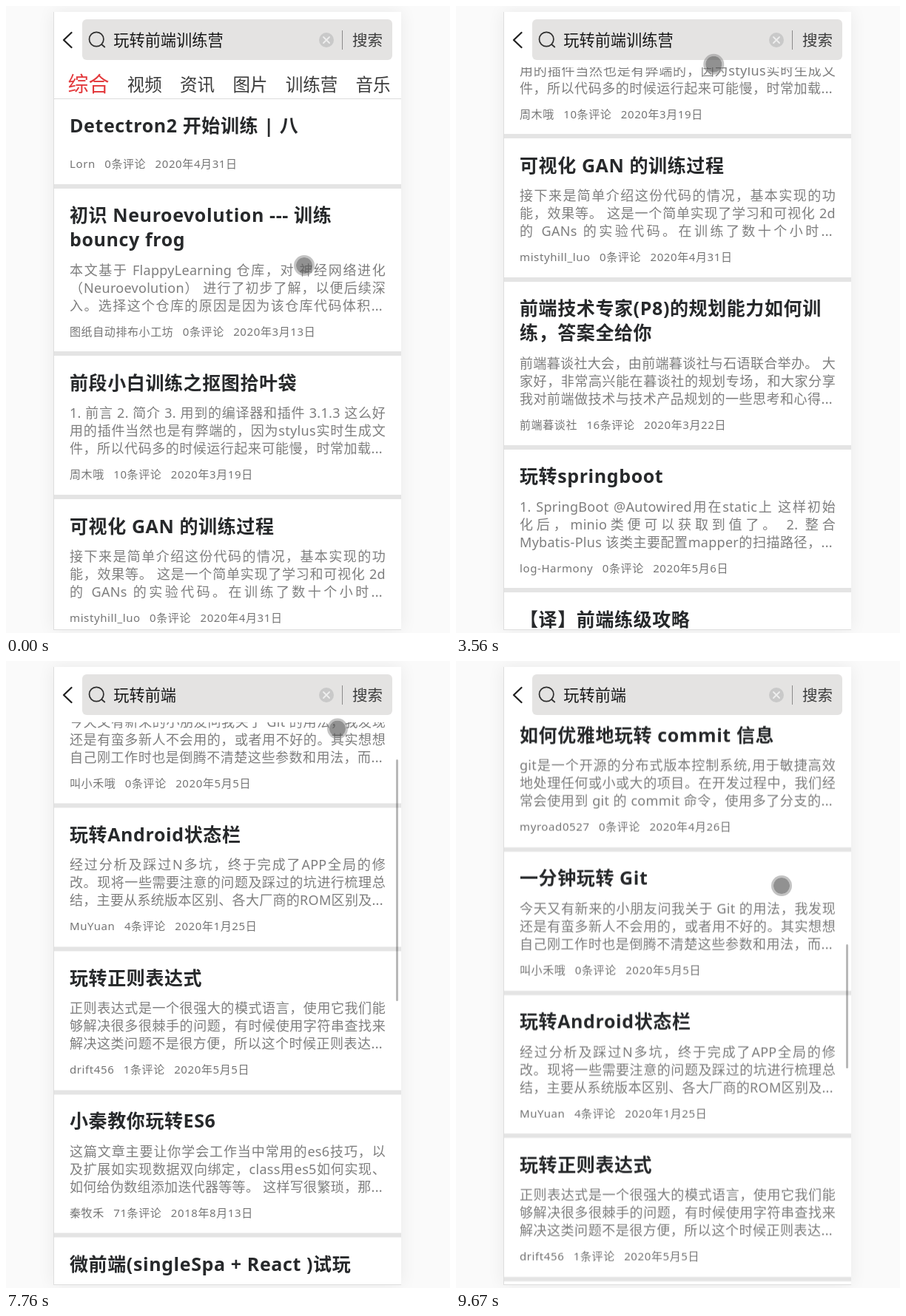
Recreate the animation shown at these times as an HTML page. Size 600 by 848 pixels, loop 9740 ms.

```html
<!DOCTYPE html>
<html lang="zh-CN">
<head>
<meta charset="utf-8">
<title>搜索结果</title>
<style>
html, body { margin: 0; width: 100%; height: 100%; overflow: hidden; background: #fafafa; }
body { position: relative; font-family: "Noto Sans", "Noto Sans CJK SC", "Noto Sans CJK", sans-serif; }
body, div { box-sizing: border-box; }
#stage > div, #view > div { position: absolute; }
#stage { position: absolute; left: 0; top: 0; width: 600px; height: 848px; overflow: hidden; }
#phone { left: 64px; top: 8px; width: 470px; height: 836px; background: #fff;
  border: solid #dedede; border-width: 0 0 1px 1px; box-shadow: 0 0 22px rgba(0,0,0,.07); }
#view { left: 65px; top: 8px; width: 469px; height: 835px; overflow: hidden; }
.list { left: 0; top: 117px; width: 469px; will-change: transform; }
.item { padding: 19.5px 0 17.7px 21px; border-bottom: 6px solid #e4e4e4; white-space: nowrap; }
.title { font-weight: 700; font-size: 25px; line-height: 33px; letter-spacing: .6px; color: #27292b; }
.desc { padding: 12.5px 0 13px; width: 427px; font-size: 18px; line-height: 24px;
  letter-spacing: .3px; color: #7e7e7e; }
.desc div { height: 24px; text-align: justify; text-align-last: justify; }
.desc div:nth-child(3) { width: 423px; }
.desc svg { width: 22px; height: 22px; vertical-align: -4px; }
.meta { font-size: 15px; line-height: 20px; letter-spacing: .6px; color: #757575; }
.meta span { margin-right: 12.4px; }
#tabs { left: 0; top: 75px; width: 469px; height: 43px; background: #fff; color: #3c3c3c;
  border-bottom: 1px solid #dcdcdc; display: flex; gap: 24.3px; padding-left: 18.5px;
  font-size: 23.5px; line-height: 47px; white-space: nowrap; }
#tabs.empty { height: 44px; border-bottom-width: 2px; }
#tabs b { font-weight: 400; font-size: 28px; line-height: 44px; color: #e3393c; }
#thumb { left: 462px; top: 0; width: 3px; border-radius: 2px; background: rgba(0,0,0,.28); }
#head { left: 0; top: 0; width: 469px; height: 75px; background: #fff; }
#head svg { position: absolute; left: -65px; top: -8px; }
#query, #go { position: absolute; top: 23px; line-height: 30px; white-space: nowrap; }
#query { left: 80.3px; font-size: 21.2px; color: #161616; }
#go { left: 403px; font-size: 20.5px; color: #3c3c3c; }
#caret { position: absolute; top: 27px; width: 1px; height: 24px; background: #111; }
#dot { left: -14px; top: -14px; width: 28px; height: 28px; border-radius: 50%;
  background: rgba(88,88,88,.66); background-clip: padding-box; border: 3px solid rgba(135,135,135,.5); }
#dot.down { border: 0; background: radial-gradient(circle, rgba(75,75,75,.72) 0 9px, rgba(90,90,90,.55) 12px, rgba(110,110,110,.15) 14px); }
</style>
</head>
<body>
<div id="stage">
  <div id="phone"></div>
  <div id="view">
    <div class="list"></div>
    <div class="list"></div>
    <div id="tabs"><b>综合</b><span>视频</span><span>资讯</span><span>图片</span><span>训练营</span><span>音乐</span></div>
    <div id="thumb"></div>
    <div id="head">
      <svg width="600" height="84" fill="none" stroke-linecap="round" stroke-linejoin="round">
        <rect x="103" y="18" width="419" height="55" rx="6" fill="#e4e3e2"/>
        <path d="M88.5 36 78 46 88.5 56" stroke="#222" stroke-width="2.3"/>
        <g stroke="#2e2e2e" stroke-width="1.7"><circle cx="122.2" cy="45" r="9.7"/><path d="M129.3 52 133.3 55.5"/></g>
        <circle cx="433" cy="46" r="10" fill="#c9c9c9"/>
        <path d="M429 42l8 8m0-8l-8 8" stroke="#eee" stroke-width="1.8"/>
        <path d="M454.5 33v26" stroke="#8a8a8a" stroke-linecap="butt"/>
      </svg>
      <div id="query"></div>
      <div id="caret"></div>
      <div id="go">搜索</div>
    </div>
  </div>
  <div id="dot"></div>
</div>
<script>
const $ = id => document.getElementById(id);

const face = extra => `<svg viewBox="0 0 22 22"><circle cx="11" cy="11" r="9.3" fill="#fcc21b" stroke="#222" stroke-width="1.3"/>${extra}</svg>`;
const icons = {
  smile: face('<path d="M5 9q2-3 4 0m4 0q2-3 4 0" fill="none" stroke="#222" stroke-width="1.3"/><path d="M7 14q4-4 8 0l2 4q-5 4-9 1z" fill="#f79329" stroke="#222" stroke-width=".8"/>'),
  shock: face('<path d="M5 6l3-1m6 0l3 1" stroke="#222"/><circle cx="7.5" cy="9" r="1.4"/><circle cx="14.5" cy="9" r="1.4"/><ellipse cx="11" cy="15" rx="2.8" ry="3.4"/>'),
  brain: '<svg viewBox="0 0 22 22"><path d="M3 14C0 9 4 4 9 4c6-2 12 2 12 8 0 3-3 4-5 4l-2 3-3-3c-4 1-7 0-8-2z" fill="#f4a3b4" stroke="#222" stroke-width="1.2"/><path d="M6 9q3-3 5 0t5 0M6 13q3-2 5 0t6-1" fill="none" stroke="#b5566c"/></svg>'
};

// Title lines, description lines, then author, replies and date
const articles = {
  detect: [['Detectron2 开始训练 | 八'], [], 'Lorn  0条评论  2020年4月31日'],
  neuro: [['初识 Neuroevolution --- 训练', 'bouncy frog'],
    ['本文基于 FlappyLearning 仓库，对 神经网络进化', '（Neuroevolution） 进行了初步了解，以便后续深', '入。选择这个仓库的原因是因为该仓库代码体积...'],
    '图纸自动排布小工坊  0条评论  2020年3月13日'],
  novice: [['前段小白训练之抠图拾叶袋'],
    ['1. 前言 2. 简介 3. 用到的编译器和插件 3.1.3 这么好', '用的插件当然也是有弊端的，因为stylus实时生成文', '件，所以代码多的时候运行起来可能慢，时常加载...'],
    '周木哦  10条评论  2020年3月19日'],
  gan: [['可视化 GAN 的训练过程'],
    ['接下来是简单介绍这份代码的情况，基本实现的功', '能，效果等。 这是一个简单实现了学习和可视化 2d', '的 GANs 的实验代码。在训练了数十个小时...'],
    'mistyhill_luo  0条评论  2020年4月31日'],
  plan: [['前端技术专家(P8)的规划能力如何训', '练，答案全给你'],
    ['前端暮谈社大会，由前端暮谈社与石语联合举办。 大', '家好，非常高兴能在暮谈社的规划专场，和大家分享', '我对前端做技术与技术产品规划的一些思考和心得...'],
    '前端暮谈社  16条评论  2020年3月22日'],
  boot: [['玩转springboot'],
    ['1. SpringBoot @Autowired用在static上 这样初始', '化后，minio类便可以获取到值了。 2. 整合', 'Mybatis-Plus 该类主要配置mapper的扫描路径，...'],
    'log-Harmony  0条评论  2020年5月6日'],
  guide: [['【译】前端练级攻略'],
    ['我记得我刚开始学习前端开发的时候。我看到了很多', '文章及资料，被学习的资料压得喘不过气来，甚至不', '知道从哪里开始。 本指南列出前端学习路线，并提...'],
    '页面小竹  17条评论  2019年4月10日'],
  git: [['一分钟玩转 Git'],
    ['今天又有新来的小朋友问我关于 Git 的用法，我发现', '还是有蛮多新人不会用的，或者用不好的。其实想想', '自己刚工作时也是倒腾不清楚这些参数和用法，而...'],
    '叫小禾哦  0条评论  2020年5月5日'],
  android: [['玩转Android状态栏'],
    ['经过分析及踩过N多坑，终于完成了APP全局的修', '改。现将一些需要注意的问题及踩过的坑进行梳理总', '结，主要从系统版本区别、各大厂商的ROM区别及...'],
    'MuYuan  4条评论  2020年1月25日'],
  regex: [['玩转正则表达式'],
    ['正则表达式是一个很强大的模式语言，使用它我们能', '够解决很多很棘手的问题，有时候使用字符串查找来', '解决这类问题不是很方便，所以这个时候正则表达...'],
    'drift456  1条评论  2020年5月5日'],
  es6: [['小秦教你玩转ES6'],
    ['这篇文章主要让你学会工作当中常用的es6技巧，以', '及扩展如实现数据双向绑定，class用es5如何实现、', '如何给伪数组添加迭代器等等。 这样写很繁琐，那...'],
    '秦牧禾  71条评论  2018年8月13日'],
  spa: [['微前端(singleSpa + React )试玩'],
    ['我们团队正在做一个XX系统，技术栈是React，目前', '该系统日渐庞大，开发及维护成本加大，且每次必须', '把整个项目一起打包，费时费力。经考虑后决定将...'],
    'Ky  29条评论  2019年10月19日'],
  refresh: [['玩儿转下拉刷新，FRefresh'],
    ['现在，开发者，请集中注意力 {smile}。 经过大脑 {brain} 的', '一番飞速旋转，也许我们最终会发现这其中有诈 {shock}', '！嗯～这不是一个容易的事情啊。 . . . 每一个过程...'],
    'PlumVault  10条评论  2020年4月21日'],
  commit: [['如何优雅地玩转 commit 信息'],
    ['git是一个开源的分布式版本控制系统,用于敏捷高效', '地处理任何或小或大的项目。在开发过程中，我们经', '常会使用到 git 的 commit 命令，使用多了分支的...'],
    'myroad0527  0条评论  2020年4月26日']
};

const rows = lines => lines.map(s => `<div>${s.replace(/\{(\w+)\}/g, (_, k) => icons[k])}</div>`).join('');
function card(key) {
  const [title, desc, meta] = articles[key];
  const parts = meta.split('  ').map(s => `<span>${s}</span>`).join('');
  return `<div class="item"><div class="title">${rows(title)}</div>` +
    `<div class="desc">${rows(desc)}</div><div class="meta">${parts}</div></div>`;
}

// Each list holds its first page and the page loaded at its end
const lists = [...document.querySelectorAll('.list')];
['detect neuro novice gan plan boot guide git android regex',
 'guide git android regex es6 spa refresh plan boot commit'].forEach((names, i) => {
  const page = names.split(' ');
  lists[i].innerHTML = [...page, ...page.slice(1)].map(card).join('');
});
const pageHeights = lists.map(el => el.children[10].offsetTop);

const LOOP = 9740, SEARCH = 6560, LOADED = 6890;
const VIEW = 718, TRACK = 826, HEADER = 117;

const clamp = (v, lo = 0, hi = 1) => Math.max(lo, Math.min(hi, v));
const ramp = (t, from, to) => clamp((t - from) / (to - from));
const easeOut = k => 1 - (1 - k) ** 3;

// Pointer stops: arrival, x, y
const stops = [[0, 403, 351], [2330, 401, 366], [3840, 343, 50], [6270, 486, 48], [7450, 448, 273], [9670, 440, 304]];
const TRAVEL = 620;
// Swipes up and back: start, duration, reach
const swipes = [[190, 700, 325], [1880, 400, 150], [2330, 700, 240], [7170, 800, 248], [8420, 600, 150], [9180, 420, 150]];

function pointer(t) {
  let [, x, y] = stops[0];
  for (const [arrive, sx, sy] of stops.slice(1)) {
    const k = easeOut(ramp(t, arrive - TRAVEL, arrive));
    x += (sx - x) * k;
    y += (sy - y) * k;
  }
  for (const [start, span, reach] of swipes) y -= reach * Math.sin(Math.PI * ramp(t, start, start + span));
  return [x, y];
}

const isDown = t => swipes.some(([start, span]) => t >= start && t < start + span / 2) ||
  [3840, SEARCH].some(click => t >= click && t < click + 330);

const scrolls = [
  t => 1213 * ramp(t, 150, 1265) + 202 * easeOut(ramp(t, 1880, 2330)) + 882 * easeOut(ramp(t, 2330, 2880)),
  t => 626 * ramp(t, 7170, 8350) + 1211 * ramp(t, 8420, 9670)
];
const thumbAlpha = t => t < 1740 ? +(t >= 190) : t < SEARCH ? (t >= 1880) * (1 - ramp(t, 3210, 3560)) : +(t >= 7170);

function draw(now) {
  const t = now % LOOP, n = t < SEARCH ? 0 : 1, empty = t >= SEARCH && t < LOADED;
  const y = scrolls[n](t);
  lists.forEach((el, i) => {
    el.style.visibility = i === n && !empty ? 'visible' : 'hidden';
    el.style.transform = `translateY(${-y}px)`;
  });

  const hideAt = n ? 7170 : 190;
  $('tabs').style.transform = `translateY(${-44 * ramp(t, hideAt, hideAt + 280)}px)`;
  $('tabs').className = empty ? 'empty' : '';

  const pages = y > pageHeights[n] - VIEW + 1 ? 2 : 1;
  const total = pages * pageHeights[n];
  const size = TRACK * TRACK / (total + HEADER);
  $('thumb').style.height = size + 'px';
  $('thumb').style.transform = `translateY(${y * (TRACK - size) / (total - VIEW)}px)`;
  $('thumb').style.opacity = thumbAlpha(t);

  const count = 7 - clamp(Math.floor((t - 4710) / 200), 0, 3);
  $('query').textContent = '玩转前端训练营'.slice(0, count);
  $('caret').style.left = 80 + 21.2 * count + 'px';
  $('caret').style.opacity = t >= 3840 && t < SEARCH - 140 && (t - 3840) % 700 < 350 ? 1 : 0;

  const [px, py] = pointer(t);
  $('dot').style.transform = `translate(${px}px, ${py}px)`;
  $('dot').className = isDown(t) ? 'down' : '';
}

const start = performance.now();
(function loop() {
  draw(performance.now() - start);
  requestAnimationFrame(loop);
})();
</script>
</body>
</html>
```
